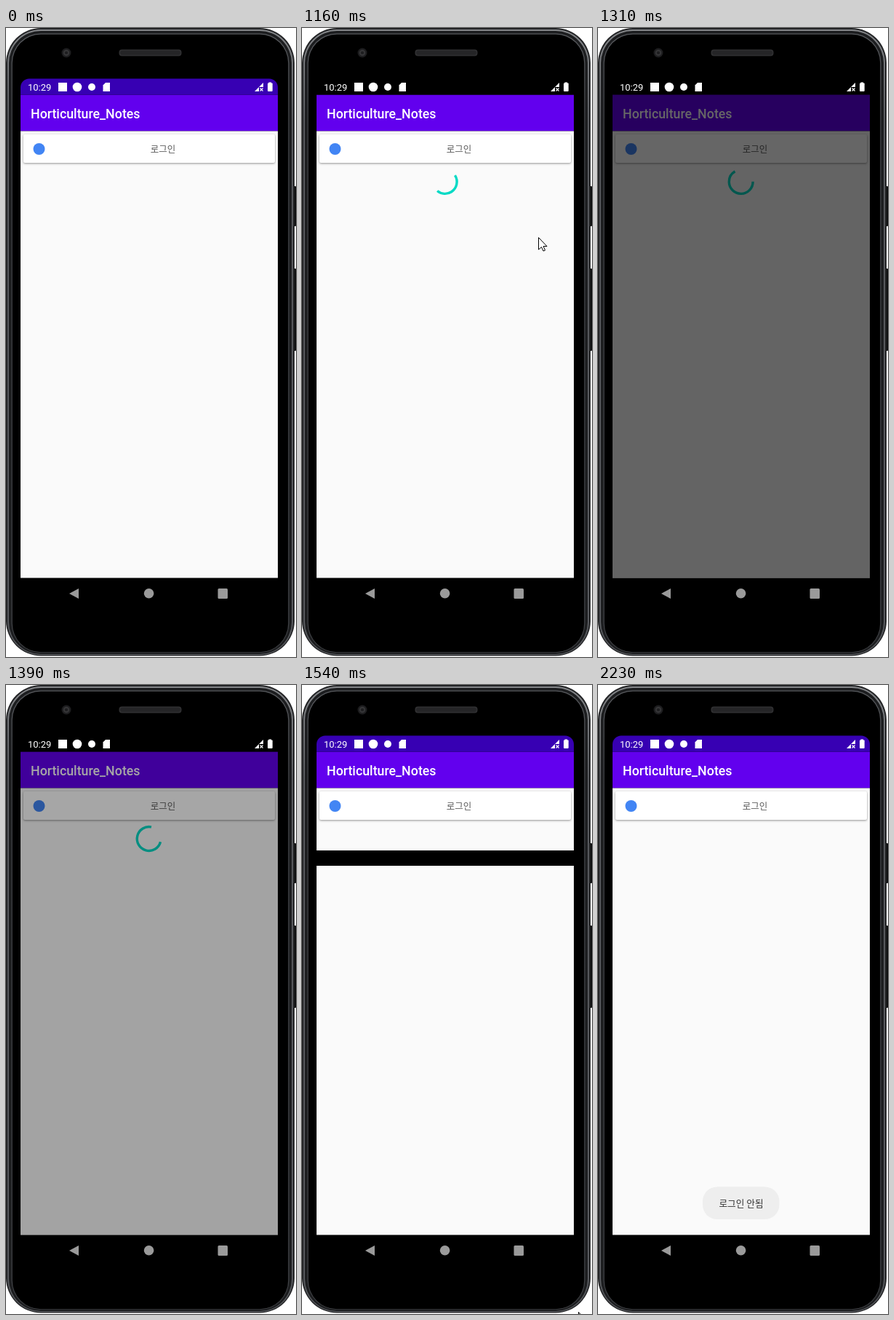
An HTML page with a canvas for the animation above (3.56 s loop, 399 px wide and 863 px high).

```html
<!DOCTYPE html>
<html lang="ko">
<head>
<meta charset="utf-8">
<title>Login demo</title>
<style>
  html, body { margin: 0; width: 100%; height: 100%; overflow: hidden; background: #fff; }
  canvas { display: block; width: 399px; height: 863px; }
</style>
</head>
<body>
<canvas id="stage"></canvas>
<script>
const W = 399, H = 863, LOOP = 3560;
const STEP = 76.8; // ms between screen captures; all beats below count these steps
const ENTER = 3, PRESS = 10, BUSY = 12, LEAVE = 16, DARKEST = 17, CLOSED = 20, GONE = 25;
const SCREEN = { x: 20, w: 354, top: 69.5, bar: 91.5, body: 141.5, bottom: 754.5 };
const LATIN = 'Roboto, sans-serif';
const HANGUL = '"Noto Sans CJK KR", "Noto Sans CJK", "Noto Sans CJK JP", sans-serif';
const NAV = '#9a9a9a';

const canvas = document.getElementById('stage');
const g = canvas.getContext('2d');
const ratio = window.devicePixelRatio || 1;
canvas.width = Math.round(W * ratio);
canvas.height = Math.round(H * ratio);

const clamp = v => Math.max(0, Math.min(1, v));
const lerp = (a, b, p) => a + (b - a) * p;
const bezier = (a, b, c, d, p) => {
  const q = 1 - p;
  return a * q ** 3 + 3 * b * p * q * q + 3 * c * p * p * q + d * p ** 3;
};

function rect(x, y, w, h, color) {
  g.fillStyle = color;
  g.fillRect(x, y, w, h);
}

function round(x, y, w, h, r, color) {
  g.fillStyle = color;
  g.beginPath();
  g.roundRect(x, y, w, h, r);
  g.fill();
}

function disc(x, y, r, color) {
  g.fillStyle = color;
  g.beginPath();
  g.arc(x, y, r, 0, Math.PI * 2);
  g.fill();
}

function poly(points, fill, stroke) {
  g.beginPath();
  points.forEach(([x, y]) => g.lineTo(x, y));
  g.closePath();
  g.fillStyle = fill;
  g.fill();
  if (stroke) {
    g.strokeStyle = stroke;
    g.lineWidth = 1;
    g.stroke();
  }
}

function text(str, x, y, font, color, align = 'left') {
  g.font = font;
  g.fillStyle = color;
  g.textAlign = align;
  g.fillText(str, x, y);
}

// Metal that is bright at the top and fades downwards
function metal(top, bottom) {
  const fill = g.createLinearGradient(0, 0, 0, H);
  fill.addColorStop(0, top);
  fill.addColorStop(0.15, bottom);
  return fill;
}

// One nested layer of the case; the lower rim is thinner
function shell(inset, color) {
  const h = 861.5 - inset * 1.6;
  round(inset, inset, 397 - inset * 2, h, 48 - inset, color);
}

function drawPhone() {
  rect(0, 0, W, H, '#fff');
  round(394, 217, 5, 55, 1, '#0c0d0e');
  round(394, 330, 5, 113, 1, '#0c0d0e');
  shell(0, '#222325');
  shell(2, metal('#85878a', '#56585c'));
  shell(4, '#1c1d1f');
  shell(7.5, metal('#5a5c60', '#404246'));
  shell(8.8, '#000');

  for (let i = 0; i < 3; i++) disc(83, 34, 6.5 - i * 2.2, i === 1 ? '#353537' : '#1d1d1f');
  round(155.5, 29.5, 86, 9, 4, '#303032');
  round(157, 31, 83, 6, 3, '#252527');

  poly([[87, 776], [100, 769], [100, 783]], NAV);
  disc(196.6, 775.8, 6.8, NAV);
  round(291.5, 769, 13.5, 14, 1.5, NAV);
}

function drawStatus(color) {
  const { x, w, top, bar } = SCREEN;
  round(x, top, w, bar - top, [12, 12, 0, 0], color);
  text('10:29', 30, 85.5, '13px ' + LATIN, '#fff');
  rect(72, 75, 12, 12, '#fff');
  disc(98, 81, 6.3, '#fff');
  disc(118, 81, 5, '#fff');
  poly([[137, 75], [143, 75], [143, 87], [133.5, 87], [133.5, 78.5]], '#fff');

  poly([[354, 75], [354, 81], [348, 81], [348, 87], [342, 87]], '#fff');
  g.strokeStyle = '#fff';
  g.lineWidth = 1.2;
  g.beginPath();
  for (const s of [-2, 2]) {
    g.moveTo(351.5 - s, 82.5);
    g.lineTo(351.5 + s, 86.5);
  }
  g.stroke();

  rect(361.5, 74.5, 3.5, 2, '#fff');
  round(360, 75.5, 6.7, 11.5, 1, '#fff');
}

function drawApp() {
  const { x, w, bar, body, bottom } = SCREEN;
  rect(x, bar, w, body - bar, '#6200ee');
  rect(x, body, w, bottom - body, '#fafafa');
  text('Horticulture_Notes', 34, 124, '500 17.8px ' + LATIN, '#fff');
  g.save();
  g.shadowColor = 'rgba(0,0,0,0.42)';
  g.shadowBlur = 3 * ratio;
  g.shadowOffsetY = ratio;
  round(24, 146, 346, 39, 2, '#fff');
  g.restore();
  disc(45.5, 166, 8, '#4285f4');
  text('로그인', 216, 170.5, '500 12.5px ' + HANGUL, '#5c5c5c', 'center');
}

// The tail turns steadily while the head runs ahead and slows down
function drawSpinner(n) {
  const k = n - 15;
  const tail = -33 + 16 * k;
  const head = Math.max(tail + 8, 130 + 64 * k - 4.5 * k * k);
  g.strokeStyle = '#03dac5';
  g.lineWidth = 3.4;
  g.beginPath();
  g.arc(196.7, 211, 16.4, tail * Math.PI / 180, head * Math.PI / 180);
  g.stroke();
}

function drawDim(n) {
  const k = n - DARKEST;
  const alpha = clamp(0.6 + (k < 0 ? 0.3 : -0.25) * k);
  rect(SCREEN.x, SCREEN.bar, SCREEN.w, SCREEN.bottom - SCREEN.bar, `rgba(0,0,0,${alpha})`);
}

function drawToast(n) {
  const age = n - CLOSED;
  g.globalAlpha = clamp(age / 3);
  round(144, 688.5, 105.5, 44.5, 20, '#eee');
  g.globalAlpha = clamp(age / 8);
  text('로그인 안됨', 197, 715.5, '12.7px ' + HANGUL, '#333', 'center');
  g.globalAlpha = 1;
}

// Swoops in to the button, leaves to the lower right, then slides along the bottom edge
function cursorAt(n) {
  if (n <= PRESS + 1) {
    const p = clamp((n - ENTER) / (PRESS - ENTER));
    return [bezier(374, 340, 190, 177, p), bezier(472, 150, -48, 155, p)];
  }
  if (n <= LEAVE) {
    const p = (n - PRESS - 1) / 4;
    return [lerp(177, 325, p), lerp(155, 287, p)];
  }
  return [380 - 7 * (n - CLOSED), 860];
}

function drawCursor(n) {
  if (n < ENTER || (n > LEAVE && n < CLOSED) || n > GONE) return;
  const [x, y] = cursorAt(n);
  if (n === PRESS || n === PRESS + 1) disc(x, y, 12, 'rgba(255,245,0,0.52)');
  const arrow = [[0, 0], [0, 16.5], [4, 13], [6.5, 18.5], [9, 17.5], [6.6, 12], [11.5, 12]];
  poly(arrow.map(([dx, dy]) => [x + dx + 0.5, y + dy + 0.5]), '#fff', '#000');
}

function draw(t) {
  const n = Math.floor((t + 8) / STEP);
  const busy = n >= BUSY && n < CLOSED;
  g.setTransform(ratio, 0, 0, ratio, 0, 0);
  drawPhone();
  drawApp();
  if (busy) drawSpinner(n);
  drawDim(n);
  drawStatus(busy ? '#000' : '#3700b3');
  // The closing window's status strip slides past
  if (n === CLOSED) rect(SCREEN.x, 227, SCREEN.w, 21, '#000');
  if (n > CLOSED) drawToast(n);
  drawCursor(n);
}

const start = performance.now();
function tick() {
  draw((performance.now() - start) % LOOP);
  requestAnimationFrame(tick);
}
tick();
</script>
</body>
</html>
```
